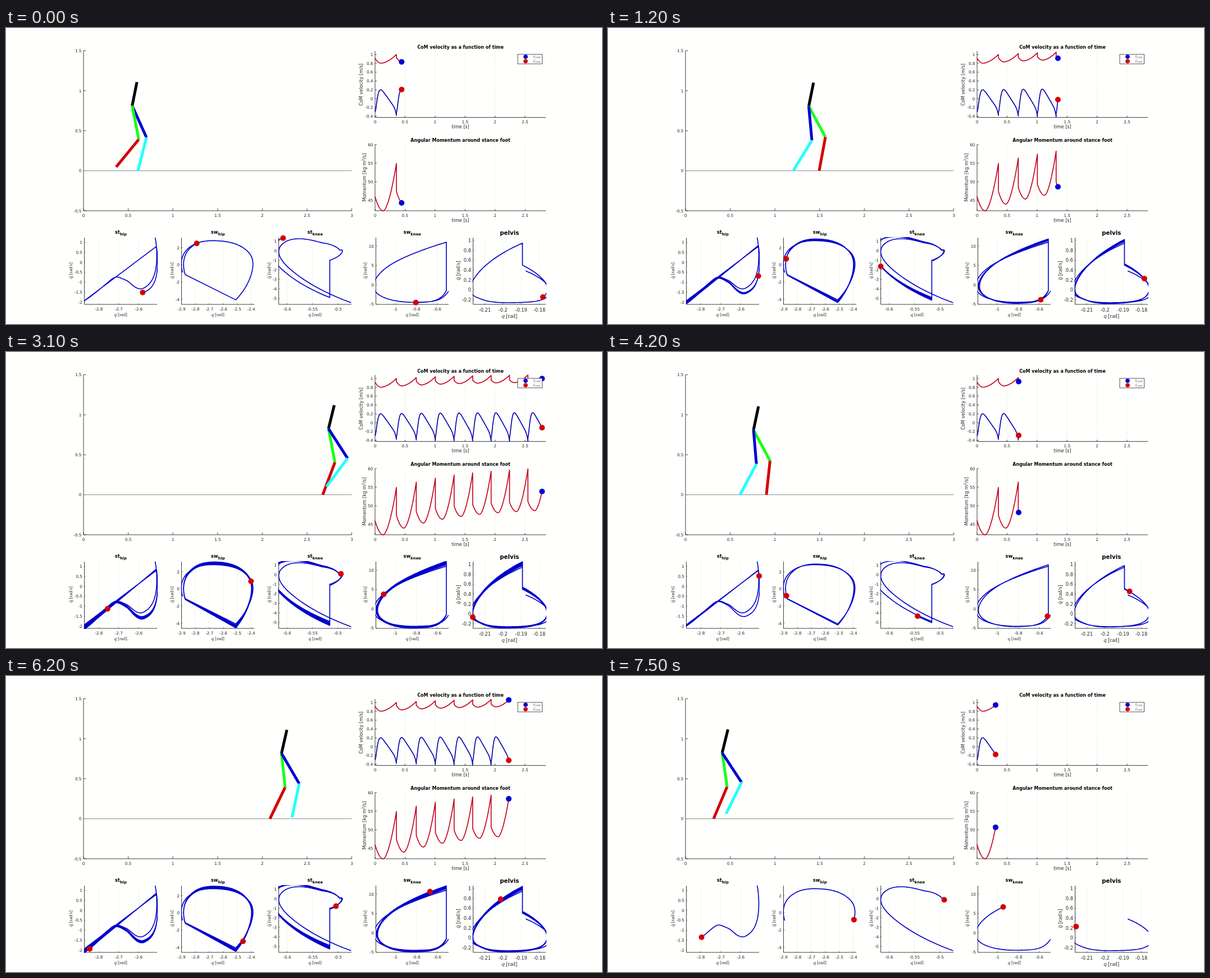
These frames come from a looping animation (1061x528 px, 7.6 s). An HTML page with a canvas:

```html
<!DOCTYPE html>
<html lang="en">
<head>
<meta charset="utf-8">
<title>Walking model</title>
<style>
html, body { margin: 0; width: 100%; height: 100%; overflow: hidden; background: #fffffd; }
canvas { display: block; width: 1061px; height: 528px; }
</style>
</head>
<body>
<canvas id="stage"></canvas>
<script>
const W = 1061, H = 528;
const canvas = document.getElementById('stage');
const dpr = window.devicePixelRatio || 1;
canvas.width = W * dpr;
canvas.height = H * dpr;
const c = canvas.getContext('2d');
c.scale(dpr, dpr);

const SANS = '"DejaVu Sans", sans-serif';
const SERIF = '"Liberation Serif", serif';
const LABEL = '8.1px ' + SANS, TITLE = 'bold 8px ' + SANS;
const INK = '#262626', PAPER = '#fffffd';
const RED = '#d40000', BLUE = '#0000d4';

// ---------- interpolation ----------
function segment(knots, x) {
  let i = 0;
  while (i < knots.length - 2 && x >= knots[i + 1]) i++;
  return i;
}

const mix = (a, b, u) => a + (b - a) * u;

function linear(knots, vals, x) {
  const i = segment(knots, x);
  return mix(vals[i], vals[i + 1], (x - knots[i]) / (knots[i + 1] - knots[i]));
}

// Smooth curve through uneven knots
function spline(knots, vals, x) {
  const i = segment(knots, x), last = knots.length - 1;
  const slope = j => (vals[j + 1] - vals[j]) / (knots[j + 1] - knots[j]);
  const tangent = j => {
    if (j === 0) return slope(0);
    if (j === last) return slope(last - 1);
    const a = knots[j] - knots[j - 1], b = knots[j + 1] - knots[j];
    return (slope(j - 1) * b + slope(j) * a) / (a + b);
  };
  const h = knots[i + 1] - knots[i], u = (x - knots[i]) / h, v = 1 - u;
  return vals[i] * v * v * (1 + 2 * u) + vals[i + 1] * u * u * (3 - 2 * u)
    + h * u * v * (tangent(i) * v - tangent(i + 1) * u);
}

// ---------- gait ----------
// Steps get shorter in time and stronger as the walk settles
const STEPS = 9, SAMPLES = 120;
const impacts = [0];
for (let n = 0; n < STEPS; n++) impacts.push(impacts[n] + .306 + .05 * .5 ** n);
const gainOf = n => 1 - .75 ** n;

// Joint speeds (rad/s) at a few phases of a step; angles follow by integration.
// q: angle after one impact and before the next; open: extra angle and speed at launch
const PHASES = [0, .1, .25, .45, .65, .85, 1];
const joints = [
  { name: 'st', sub: 'hip', q: [-2.511, -2.873], v: [.8, -.68, -1.5, -.97, -.78, -1.33, -2], open: [-.006, .47],
    x: [-2.8724, -2.5074, .1], y: [-2.113, 1.239, .5] },
  { name: 'sw', sub: 'hip', q: [-2.873, -2.511], v: [-1.14, .7, 2.4, 2.85, 1.95, -.45, -4.2], open: [-.018, .2],
    x: [-2.8996, -2.378, .1], y: [-4.593, 3.16, 2] },
  { name: 'st', sub: 'knee', q: [-.516, -.516], v: [-4.9, -1.5, 1.2, .85, .07, -.05, -1.05], open: [.042, -.7],
    x: [-.6165, -.4733, .05], y: [-5.614, 1.345, 1] },
  { name: 'sw', sub: 'knee', q: [-.514, -.514], v: [-1.45, -3.7, -4.6, -3.75, -.3, 6.3, 11.4], open: [.02, -.25],
    x: [-1.187, -.492, .2], y: [-5.087, 12.21, 5] },
  { name: 'pelvis', sub: '', q: [-.1893, -.1893], v: [.5, .21, -.13, -.262, -.205, .16, .98], open: [.0018, -.1],
    x: [-.21646, -.17646, .01], y: [-.2965, 1.06, .2], big: true }
];

function buildStep(n) {
  const span = impacts[n + 1] - impacts[n], gain = gainOf(n), rows = [];
  for (let i = 0; i <= SAMPLES; i++) {
    const p = i / SAMPLES, prev = rows[i - 1];
    const v = joints.map(j => spline(PHASES, j.v, p) * (1 + .13 * (gain - .25)));
    const q = v.map((speed, k) => prev ? prev.q[k] + (speed + prev.v[k]) / 2 * span / SAMPLES : joints[k].q[0]);
    rows.push({ t: impacts[n] + span * p, n, p, gain, q, v });
  }
  const drift = joints.map((j, k) => j.q[1] - rows[SAMPLES].q[k]);
  for (const row of rows) {
    const fade = n === 0 ? Math.max(0, 1 - row.p / .6) ** 2 : 0;
    joints.forEach((j, k) => {
      row.q[k] += drift[k] * row.p + j.open[0] * fade;
      row.v[k] += j.open[1] * fade;
    });
  }
  return rows;
}

const samples = [];
for (let n = 0; n < STEPS; n++) samples.push(...buildStep(n));
const times = samples.map(s => s.t);

function stateAt(t) {
  const i = segment(times, t), a = samples[i], b = samples[i + 1];
  const u = (t - a.t) / (b.t - a.t);
  const blend = key => a[key].map((val, k) => mix(val, b[key][k], u));
  return { ...a, t, p: mix(a.p, b.p, u), q: blend('q'), v: blend('v'), index: i };
}

// ---------- clock ----------
const FRAME = 100, LOOP = 76, RUN = 39, OFFSET = 6;
const PACE = [[0, 0], [3, .309], [6, .443], [9, .693], [18, 1.348], [29, 2.228], [37, 2.783], [38, 2.846]];

// Every impact costs extra playing time
function effort(t) {
  const n = segment(impacts, t);
  return t + (n ? .13 * (n - 1 + Math.min(1, (t - impacts[n]) / .016)) : 0);
}
const efforts = times.map(effort);

function simTime(frame) {
  const spent = linear(PACE.map(k => k[0]), PACE.map(k => effort(k[1])), frame);
  return linear(efforts, times, spent);
}

// ---------- body speeds ----------
function valley(p, at, start, low, end) {
  return p < at
    ? mix(low, start, ((at - p) / at) ** 2)
    : mix(low, end, ((p - at) / (1 - at)) ** 1.7);
}

const forward = ({ p, gain }) => valley(p, .28, .915 + .06 * gain, .803 + .12 * gain, 1 + .09 * gain);
const momentum = ({ p, gain }) => valley(p, .38, 46 + 5.7 * gain, 42.2 + 7.2 * gain, 54.9 + 5.75 * gain);
const vertical = ({ p, gain }) =>
  (.42 - .68 * p - .72 * Math.exp(-((p / .13) ** 1.5)) - .12 * p ** 20) * (1 + .13 * gain);

// ---------- drawing helpers ----------
function line(pts, color, width) {
  c.beginPath();
  pts.forEach(([x, y], i) => i ? c.lineTo(x, y) : c.moveTo(x, y));
  c.strokeStyle = color;
  c.lineWidth = width;
  c.stroke();
}

function dot([x, y], color, r = 5) {
  c.beginPath();
  c.arc(x, y, r, 0, 7);
  c.fillStyle = color;
  c.fill();
}

function text(str, x, y, font, align = 'center', color = INK) {
  c.font = font;
  c.textAlign = align;
  c.fillStyle = color;
  c.fillText(str, x, y);
}

function textWidth(str, font) {
  c.font = font;
  return c.measureText(str).width;
}

// Pieces of [text, font, drop] set side by side and centred on x
function runs(parts, x, y, color = INK) {
  let left = x - parts.reduce((sum, [str, font]) => sum + textWidth(str, font), 0) / 2;
  for (const [str, font, drop = 0] of parts) {
    text(str, left, y + drop, font, 'left', color);
    left += textWidth(str, font);
  }
}

function upright(x, y, draw) {
  c.save();
  c.translate(x, y);
  c.rotate(-Math.PI / 2);
  draw();
  c.restore();
}

// ---------- axes ----------
// box in pixels; x and y hold [low, high, tick step]
function makeAxes(box, x, y, style = {}) {
  const [x0, y0, x1, y1] = box;
  return {
    box, x, y, size: 7.3, tick: 3, grid: true, gap: 10.5, ...style,
    at: (vx, vy) => [mix(x0, x1, (vx - x[0]) / (x[1] - x[0])), mix(y1, y0, (vy - y[0]) / (y[1] - y[0]))]
  };
}

function ticks([low, high, step]) {
  const out = [];
  for (let i = Math.ceil(low / step - .01); i * step <= high + step * .01; i++) out.push(+(i * step).toFixed(4));
  return out;
}

// Draws the frame and returns the x for the upright label
function drawAxes({ box: [x0, y0, x1, y1], x, y, at, size, tick, grid, gap }) {
  const font = size + 'px ' + SANS;
  for (const v of ticks(x)) {
    const px = at(v, 0)[0];
    if (grid && px > x0 + 2) {
      c.setLineDash([1, 1]);
      line([[px, y0], [px, y1]], '#e6e6e4', 1);
      c.setLineDash([]);
    }
    line([[px, y1], [px, y1 - tick]], INK, .8);
    text(String(v), px, y1 + gap, font);
  }
  let widest = 0;
  for (const v of ticks(y)) {
    const py = at(0, v)[1], str = String(v);
    line([[x0, py], [x0 + tick, py]], INK, .8);
    text(str, x0 - 3.5, py + size * .37, font, 'right');
    widest = Math.max(widest, textWidth(str, font));
  }
  line([[x0, y0], [x0, y1], [x1, y1]], INK, .9);
  return x0 - 7.5 - widest;
}

function drawTrace({ box: [x0, y0, x1, y1] }, point, state, color) {
  const path = samples.slice(0, state.index + 1).concat(state).map(point);
  c.save();
  c.beginPath();
  c.rect(x0 - 1, y0 - 1, x1 - x0 + 2, y1 - y0 + 2);
  c.clip();
  c.lineJoin = 'round';
  line(path, color, 1.65);
  c.restore();
}

const walkAxes = makeAxes([138, 40.5, 615.5, 326], [0, 3, .5], [-.5, 1.5, .5], { tick: 4.5, grid: false });
const speedAxes = makeAxes([657, 41, 961, 159.5], [0, 2.846, .5], [-.4257, 1.08, .2]);
const momentumAxes = makeAxes([657, 207.8, 961, 326], [0, 2.846, .5], [42.21, 60, 5]);
const phaseAxes = joints.map((j, i) => {
  const left = 139.5 + 173 * i;
  return makeAxes([left, 374, left + 129.5, 493], j.x, j.y,
    { tick: 1.5, size: j.big ? 8.3 : 7.3, gap: j.big ? 13 : 11 });
});

// ---------- panels ----------
const TORSO = .3, LIMB = .427;

function drawWalker({ n, q: [stHip, swHip, stKnee, swKnee, pelvis] }) {
  const move = ([x, y], angle, len) => [x - Math.sin(angle) * len, y + Math.cos(angle) * len];
  const stThigh = pelvis + stHip, swThigh = pelvis + swHip;
  const foot = [.314 + .2952 * n, 0];
  const knee = move(foot, stThigh + stKnee, -LIMB);
  const hip = move(knee, stThigh, -LIMB);
  const swingKnee = move(hip, swThigh, LIMB);
  const swingFoot = move(swingKnee, swThigh + swKnee, LIMB);
  const legs = [['#18ff18', '#d40000'], ['#0000d4', '#22ffff']];
  const stance = legs[n % 2], swing = legs[(n + 1) % 2];
  const limb = (a, b, color) => line([walkAxes.at(...a), walkAxes.at(...b)], color, 5);
  limb(hip, move(hip, pelvis, TORSO), '#000');
  limb(hip, knee, stance[0]);
  limb(knee, foot, stance[1]);
  limb(hip, swingKnee, swing[0]);
  limb(swingKnee, swingFoot, swing[1]);
}

function drawWalkPanel(state) {
  drawAxes(walkAxes);
  line([walkAxes.at(0, 0), walkAxes.at(3, 0)], '#8c8c8c', 1);
  drawWalker(state);
}

function drawLegend() {
  c.fillStyle = '#fff';
  c.fillRect(911, 47, 43.5, 17);
  c.strokeStyle = INK;
  c.lineWidth = .8;
  c.strokeRect(911, 47, 43.5, 17);
  [['ẋ', BLUE], ['ż', RED]].forEach(([sym, color], i) => {
    const y = 51.2 + 8.1 * i;
    dot([925, y], color, 3.8);
    runs([[sym, 'italic 7.5px ' + SERIF], ['com', 'italic 6px ' + SERIF, 1]], 945, y + 2, '#666');
  });
}

function drawSpeeds(state) {
  const labelX = drawAxes(speedAxes);
  text('CoM velocity as a function of time', 809, 36.5, TITLE, 'center', '#000');
  text('time [s]', 809, 179, LABEL);
  upright(labelX, 101, () => text('CoM velocity [m/s]', 0, 0, LABEL));
  const top = s => speedAxes.at(s.t, forward(s)), low = s => speedAxes.at(s.t, vertical(s));
  drawTrace(speedAxes, top, state, '#c4001a');
  drawTrace(speedAxes, low, state, '#0000b0');
  dot(top(state), BLUE);
  dot(low(state), RED);
  drawLegend();
}

function drawMomentum(state) {
  const labelX = drawAxes(momentumAxes);
  text('Angular Momentum around stance foot', 809, 203, TITLE, 'center', '#000');
  text('time [s]', 809, 346, LABEL);
  upright(labelX + 1, 266.5, () =>
    runs([['Momentum [kg m', LABEL], ['2', '6.2px ' + SANS, -3.5], ['/s]', LABEL]], 0, 0));
  const point = s => momentumAxes.at(s.t, momentum(s));
  drawTrace(momentumAxes, point, state, '#c4001a');
  dot(point(state), BLUE);
}

function drawPhase(joint, k, state) {
  const axes = phaseAxes[k], labelX = drawAxes(axes);
  const mid = (axes.box[0] + axes.box[2]) / 2;
  const size = joint.big ? 10.3 : 8.6;
  const roman = size + 'px ' + SERIF, italic = 'italic ' + roman;
  if (joint.big) text(joint.name, mid, 368.5, 'bold 10.2px ' + SANS, 'center', '#000');
  else runs([[joint.name, 'bold 8.4px ' + SANS], [joint.sub, 'bold 6.8px ' + SANS, 3.3]], mid, 366.5, '#000');
  runs([['q', italic], [' [rad]', roman]], mid, joint.big ? 517 : 514);
  upright(labelX, 432.5, () => {
    runs([['q', italic], [' [rad/s]', roman]], 0, 0);
    dot([2.6 - textWidth('q [rad/s]', roman) / 2, -size * .62], INK, .6);
  });
  const point = s => axes.at(s.q[k], s.v[k]);
  drawTrace(axes, point, state, '#0000cc');
  dot(point(state), RED);
}

function draw(frame) {
  const state = stateAt(simTime((frame + OFFSET) % RUN));
  c.fillStyle = PAPER;
  c.fillRect(0, 0, W, H);
  drawWalkPanel(state);
  drawSpeeds(state);
  drawMomentum(state);
  joints.forEach((joint, k) => drawPhase(joint, k, state));
}

const start = performance.now();
let shown = -1;
function tick() {
  const frame = Math.floor((performance.now() - start) / FRAME) % LOOP;
  if (frame !== shown) {
    shown = frame;
    draw(frame);
  }
  requestAnimationFrame(tick);
}
tick();
</script>
</body>
</html>
```
